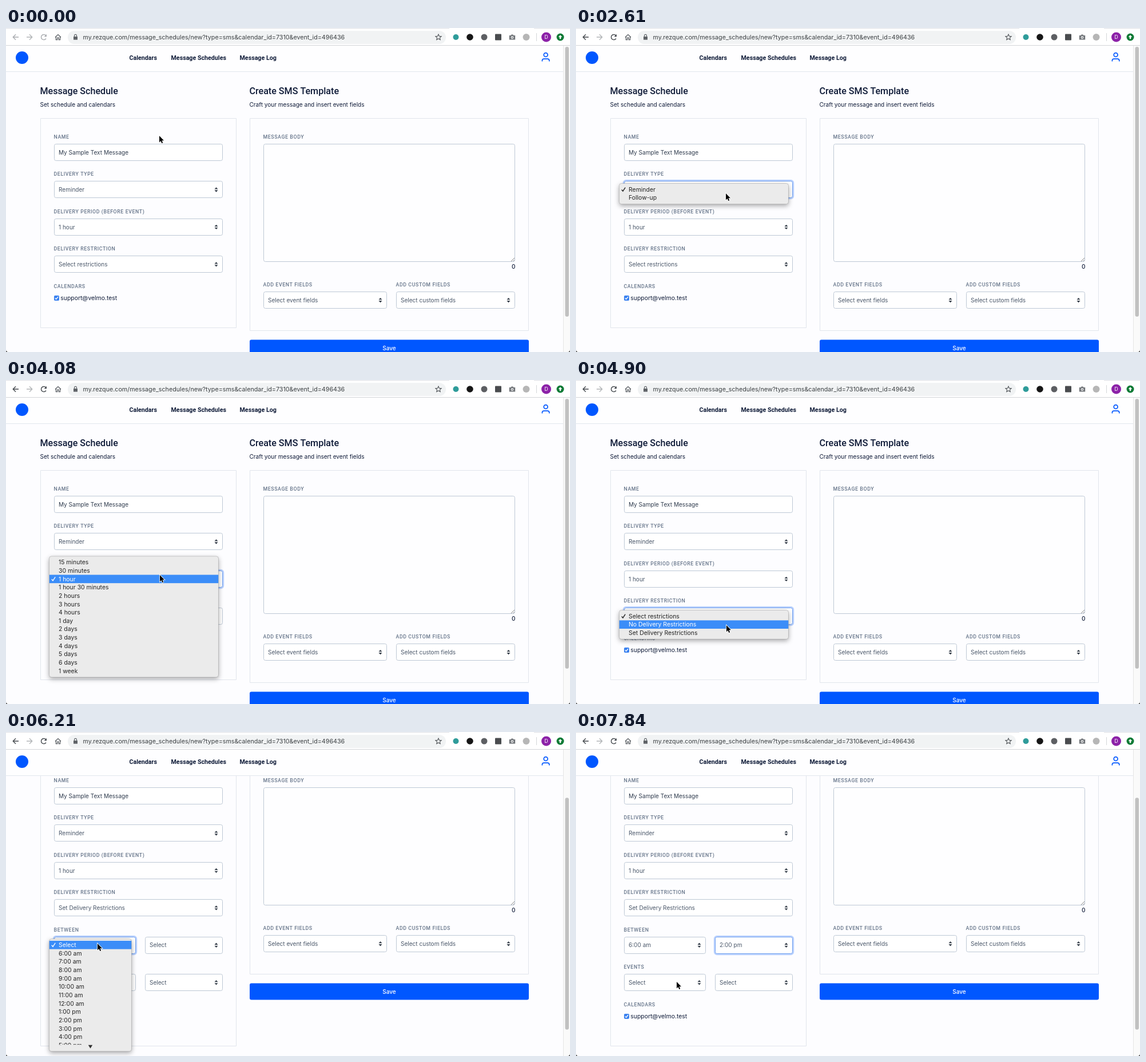
Animation, 986 px wide and 568 px high, one loop 8 s. Source, as an HTML page with a canvas:

```html
<!DOCTYPE html>
<html lang="en">
<head>
<meta charset="utf-8">
<title>Message schedule form</title>
<style>
  html, body { margin: 0; width: 100%; height: 100%; overflow: hidden; background: #fdfdff; }
  canvas { display: block; }
</style>
</head>
<body>
<canvas id="stage" width="986" height="568"></canvas>
<script>
const ctx = document.getElementById('stage').getContext('2d');
const LOOP = 8000, STEPS = 49;
const BODY = 'Inter, sans-serif', DISPLAY = 'Roboto, sans-serif';
const BLUE = '#0057ff', NAVY = '#0f1b38', LABEL = '#66758a', FIELD = '#4b586a';
const BODY_SIZE = 10.05, ROW = 65.45, ITEM = 14.65, EXPANDED_AT = 32;

const hours = ['Select', ...[6, 7, 8, 9, 10, 11, 12].map(h => h + ':00 am'),
  ...[1, 2, 3, 4, 5].map(h => h + ':00 pm')];

// Times are counted in steps of the loop; y is the centre of the select on the page.
const menus = [
  { x: 84, w: 295, y: 283, from: 15, hover: 17, to: 19, checked: 0,
    items: ['Reminder', 'Follow-up'] },
  { x: 84, w: 295, y: 348.8, from: 21, hover: 22, to: 27, checked: 2,
    items: ['15 minutes', '30 minutes', '1 hour', '1 hour 30 minutes', '2 hours', '3 hours',
      '4 hours', '1 day', '2 days', '3 days', '4 days', '5 days', '6 days', '1 week'] },
  { x: 84, w: 295, y: 414, from: 29, hover: 30, to: 32, checked: 0,
    items: ['Select restrictions', 'No Delivery Restrictions', 'Set Delivery Restrictions'] },
  { x: 84, w: 143, y: 479.3, from: 38, hover: 38, to: 40, checked: 0, items: hours, more: true },
  { x: 243, w: 136, y: 479.3, from: 41, hover: 42, to: 46, checked: 0, items: hours, more: true }
];

const pointerPath = [[0, 268, 189], [4, 264, 226], [9, 262, 262], [14, 262, 288], [16, 262, 290],
  [19, 264, 286], [21, 269, 341], [25, 269, 342], [27, 268, 346], [29, 264, 411], [30, 263, 430],
  [31, 263, 442], [35, 265, 444], [36, 255, 430], [38, 160, 371], [39, 160, 386], [40, 180, 384],
  [41, 270, 368], [42, 272, 368], [43, 272, 400], [45, 270, 502], [46, 268, 502], [48, 176, 438]];
const scrollPath = [[32, 0], [33, 24], [34, 80], [35, 102.5], [36, 106]];

function follow(path, step) {
  const i = path.findIndex(key => key[0] > step);
  if (i === 0) return path[0].slice(1);
  if (i < 0) return path[path.length - 1].slice(1);
  const [a, b] = [path[i - 1], path[i]];
  const k = (step - a[0]) / (b[0] - a[0]);
  return a.slice(1).map((v, j) => v + (b[j + 1] - v) * k);
}

function text(str, x, cy, size, color, { weight = 400, family = BODY, align = 'left', spacing = 0 } = {}) {
  ctx.font = `${weight} ${size}px ${family}`;
  ctx.letterSpacing = spacing + 'px';
  ctx.textAlign = align;
  ctx.fillStyle = color;
  ctx.fillText(str, x, cy + size * 0.36);
}

function box(x, y, w, h, r, fill, stroke, line = 1) {
  ctx.beginPath();
  ctx.roundRect(x, y, w, h, r);
  if (fill) { ctx.fillStyle = fill; ctx.fill(); }
  if (stroke) { ctx.strokeStyle = stroke; ctx.lineWidth = line; ctx.stroke(); }
}

function disc(x, y, r, fill) {
  ctx.beginPath();
  ctx.arc(x, y, r, 0, Math.PI * 2);
  ctx.fillStyle = fill;
  ctx.fill();
}

function path(x, y, d, { stroke, fill, line = 1.4 }) {
  const shape = new Path2D(d);
  ctx.save();
  ctx.translate(x, y);
  if (stroke) { ctx.strokeStyle = stroke; ctx.lineWidth = line; ctx.stroke(shape); }
  if (fill) { ctx.fillStyle = fill; ctx.fill(shape); }
  ctx.restore();
}

function heading(str, x, y) {
  text(str, x, y, 16.1, NAVY, { weight: 500, family: DISPLAY });
}

function label(str, x, y) {
  text(str, x, y, 8.8, LABEL, { weight: 500, family: DISPLAY, spacing: 0.58 });
}

function field(x, y, w, value, { focused, arrows = true, color = FIELD } = {}) {
  const top = Math.floor(y - 14.7) + 0.5;
  if (focused) box(x - 0.5, top - 1, w + 1, 31, 4, null, '#bcd3ff', 3.4);
  box(x + 0.5, top, w - 1, 29, 3, '#fff', focused ? '#6f9fee' : '#bdc8d5');
  text(value, x + 8, y, BODY_SIZE, color);
  if (arrows) path(x + w - 11.5, y, 'M-3-.9L0-4.2 3-.9zM-3 .9L0 4.2 3 .9z', { fill: '#343d48' });
}

function browserBar(active) {
  const nav = active ? '#454a4f' : '#a9acb0';
  ctx.fillStyle = '#fff';
  ctx.fillRect(0, 0, 986, 31);
  ctx.fillStyle = '#dfe1e5';
  ctx.fillRect(0, 0, 775, 1);
  ctx.fillRect(923, 0, 63, 1);
  ctx.fillStyle = '#d3d5d8';
  ctx.fillRect(0, 30, 986, 1);
  box(108, 5, 661, 23, 11.5, '#f1f3f4');

  path(17, 16, 'M5 0H-4.5M0-4.7L-4.7 0 0 4.7', { stroke: nav });
  path(41, 16, 'M-5 0H4.5M0-4.7L4.7 0 0 4.7', { stroke: '#b2b5b8' });
  path(66, 16, 'M4 2.5A4.6 4.6 0 1 1 3.3-3.3', { stroke: nav });
  path(66, 16, 'M5-5.2V-.8H.6z', { fill: nav });
  path(91, 16, 'M-5 .3L0-4.5 5 .3M-3.6-.5V4.6H-1.2V1.2H1.2V4.6H3.6V-.5', { stroke: '#555a5f', line: 1.2 });
  path(121.5, 16, 'M-3.5-1h7v5.6h-7z', { fill: '#5f6368' });
  path(121.5, 16, 'M-2-1V-2.6A2 2 0 0 1 2-2.6V-1', { stroke: '#5f6368', line: 1.1 });
  text('my.rezque.com/message_schedules/new?type=sms&calendar_id=7310&event_id=496436',
    134.5, 16, 10.72, '#3c4043');
  path(756, 16, 'M0-5L1.5-1.6 5.1-1.3 2.4 1.1 3.2 4.6 0 2.7-3.2 4.6-2.4 1.1-5.1-1.3-1.5-1.6z',
    { stroke: '#54585c', line: 1.1 });

  disc(786.5, 16, 5, '#2f9c9a');
  disc(811, 16, 5.8, '#161616');
  disc(836, 16, 5.5, '#5d5f63');
  box(855, 10.5, 11, 11, 1, '#4a4c4f');
  path(885, 16, 'M-5.2-3H-2.5L-1.5-4.6H1.5L2.5-3H5.2V4.5H-5.2z', { fill: '#73777b' });
  disc(885, 16.6, 2.3, '#fff');
  disc(885, 16.6, 1.2, '#73777b');
  disc(909.5, 16, 6, '#b6b6b6');
  ctx.fillStyle = '#d4d6d9';
  ctx.fillRect(927, 9, 1, 14);
  disc(944.5, 16, 8.5, '#8c22a8');
  text('D', 944.5, 16, 9, '#fff', { align: 'center' });
  disc(969, 16, 6.5, '#0d7a35');
  path(969, 16, 'M0-3.8L3.3 0H1.2V3.3H-1.2V0H-3.3z', { fill: '#fff' });
}

function siteHeader() {
  ctx.fillStyle = '#fefeff';
  ctx.fillRect(0, 31, 975, 45);
  ctx.fillStyle = '#e2e6ed';
  ctx.fillRect(0, 76, 975, 1);
  disc(28, 52, 11, BLUE);
  [['Calendars', 215.5], ['Message Schedules', 288.5], ['Message Log', 408.5]]
    .forEach(([str, x]) => text(str, x, 52.3, 10.7, NAVY, { weight: 600, family: DISPLAY }));
  ctx.beginPath();
  ctx.arc(943.6, 47, 3.4, 0, Math.PI * 2);
  ctx.strokeStyle = BLUE;
  ctx.lineWidth = 1.7;
  ctx.stroke();
  path(943.6, 58.5, 'M-6.2 0V-1.2Q-6.2-4.4-3-4.4H3Q6.2-4.4 6.2-1.2V0', { stroke: BLUE, line: 1.7 });
}

function page(step, scroll) {
  const expanded = step >= EXPANDED_AT;
  const extra = expanded ? 2 * ROW : 0;
  const focus = menus.filter(m => m.from <= step).length - 1;
  const rowY = i => 218 + i * ROW;
  const select = (x, row, w, value, index) => field(x, rowY(row), w, value, { focused: focus === index });

  ctx.save();
  ctx.beginPath();
  ctx.rect(0, 77, 975, 491);
  ctx.clip();
  ctx.translate(0, -scroll);

  heading('Message Schedule', 59.5, 110);
  text('Set schedule and calendars', 59.5, 134.7, BODY_SIZE, NAVY);
  heading('Create SMS Template', 425.5, 110);
  text('Craft your message and insert event fields', 425.5, 134.7, BODY_SIZE, NAVY);

  box(60.5, 158.5, 342, 367 + Math.round(extra), 0, '#fdfdff', '#e1e5ec');
  const labels = ['NAME', 'DELIVERY TYPE', 'DELIVERY PERIOD (BEFORE EVENT)', 'DELIVERY RESTRICTION',
    ...(expanded ? ['BETWEEN', 'EVENTS'] : []), 'CALENDARS'];
  labels.forEach((str, i) => label(str, 83.5, 190.8 + i * ROW));

  field(84, rowY(0), 295, 'My Sample Text Message', { arrows: false, color: '#303c4e' });
  select(84, 1, 295, 'Reminder', 0);
  select(84, 2, 295, '1 hour', 1);
  select(84, 3, 295, expanded ? 'Set Delivery Restrictions' : 'Select restrictions', 2);
  if (expanded) {
    select(84, 4, 143, step >= menus[3].to ? '6:00 am' : 'Select', 3);
    select(243, 4, 136, step >= menus[4].to ? '2:00 pm' : 'Select', 4);
    select(84, 5, 143, 'Select');
    select(243, 5, 136, 'Select');
  }
  const calendarY = 473 + extra;
  box(84, calendarY - 4, 9, 9, 1.8, '#3b82f0');
  path(88.5, calendarY + 0.5, 'M-2.6 0L-.8 2 2.6-2.4', { stroke: '#fff', line: 1.3 });
  text('support@velmo.test', 95.3, calendarY, 10.4, NAVY);

  box(426.5, 158.5, 487, 372, 0, '#fdfdff', '#e1e5ec');
  label('MESSAGE BODY', 449.5, 190.8);
  box(450.5, 203.5, 439, 206, 3, '#fefeff', '#bdc8d5');
  path(889, 409, 'M-6 0L0-6M-2.5 0L0-2.5', { stroke: '#777', line: 0.9 });
  text('0', 890.5, 418, 10.05, NAVY, { weight: 500, align: 'right' });
  label('ADD EVENT FIELDS', 449.5, 450);
  label('ADD CUSTOM FIELDS', 681.5, 450);
  field(450, 477.2, 216, 'Select event fields');
  field(682, 477.2, 208, 'Select custom fields');
  box(426, 546.5, 488, 29, 3, BLUE);
  text('Save', 670, 561.2, BODY_SIZE, '#fff', { weight: 500, align: 'center' });
  ctx.restore();
}

function scrollbar(step, scroll) {
  ctx.fillStyle = '#fafafa';
  ctx.fillRect(975, 31, 11, 537);
  ctx.fillStyle = '#e6e6e6';
  ctx.fillRect(974, 31, 1, 537);
  const height = step >= EXPANDED_AT ? 406.5 : 473;
  box(977.5, 33 + scroll * 0.775, 6.5, height, 3.2, '#c1c1c1');
}

function popup(menu, step, scroll, pointerY) {
  const first = menu.y - scroll - menu.checked * ITEM;
  const left = menu.x - 8.5, top = first - 10.5, width = menu.w + 1;
  const height = menu.more ? 197 : (menu.items.length - 1) * ITEM + 21.5;

  ctx.save();
  ctx.shadowColor = 'rgba(0,0,0,.35)';
  ctx.shadowBlur = 9;
  ctx.shadowOffsetY = 3;
  box(left, top, width, height, 4, '#ebebeb');
  ctx.restore();
  box(left, top, width, height, 4, null, 'rgba(0,0,0,.2)', 0.8);

  ctx.save();
  ctx.beginPath();
  ctx.rect(left, top, width, menu.more ? height - 11.5 : height);
  ctx.clip();
  const hovered = step >= menu.hover ? Math.round((pointerY - first) / ITEM) : -1;
  menu.items.forEach((item, i) => {
    const y = first + i * ITEM;
    const color = i === hovered ? '#fff' : '#242424';
    if (i === hovered) {
      ctx.fillStyle = '#3b8df8';
      ctx.fillRect(left, y - 7.3, width, ITEM);
    }
    if (i === menu.checked) path(menu.x - 1, y, 'M-3.2 .5L-1 3 3.2-3.4', { stroke: color });
    text(item, menu.x + 8, y, 10.45, color);
  });
  ctx.restore();
  if (menu.more) path(left + width / 2, top + height - 8, 'M-3.7-3H3.7L0 3z', { fill: '#333' });
}

function pointer(x, y) {
  path(x, y, 'M0 0V11.4L2.6 9 4.3 13 6.2 12.2 4.5 8.3H8z', { stroke: '#fff', line: 1.6, fill: '#000' });
}

function frame(now) {
  const step = Math.floor(((now % LOOP) + 4) / (LOOP / STEPS)) % STEPS;
  const [scroll] = follow(scrollPath, step);
  const [x, y] = follow(pointerPath, step);

  ctx.fillStyle = '#fdfdff';
  ctx.fillRect(0, 0, 986, 568);
  page(step, scroll);
  siteHeader();
  scrollbar(step, scroll);
  browserBar(step >= 12);
  const open = menus.find(m => step >= m.from && step < m.to);
  if (open) popup(open, step, scroll, y);
  pointer(x, y);
  path(0, 568, 'M0 0V-4Q0 0 4 0z', { fill: '#222' });
  path(986, 568, 'M0 0V-4Q0 0-4 0z', { fill: '#222' });
}

const start = performance.now();
function tick() {
  frame(performance.now() - start);
  requestAnimationFrame(tick);
}
tick();
</script>
</body>
</html>
```
